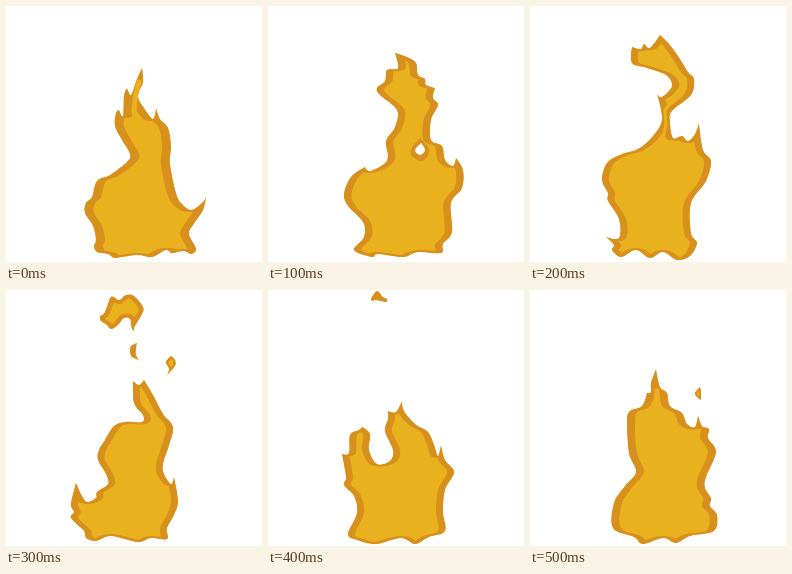
An HTML page that plays this animation: 256x256 px, repeating every 600 ms.

```html
<!DOCTYPE html>
<html lang="en">
<head>
<meta charset="utf-8">
<title>Flame</title>
<style>
html, body { margin: 0; width: 100%; height: 100%; overflow: hidden; background: #fff; }
svg { display: block; width: 100vw; height: 100vh; }
</style>
</head>
<body>
<svg id="stage" viewBox="0 0 256 256"></svg>
<script>
const STEP = 100;
const RIM = '#d8901d', CORE = '#eab11e', PAPER = '#fff';
const stage = document.getElementById('stage');
const layers = [];
let clips = 0;

function make(tag, attrs, ...children) {
  const node = document.createElementNS(stage.namespaceURI, tag);
  for (const name in attrs) node.setAttribute(name, attrs[name]);
  node.append(...children);
  return node;
}

// Closed smooth curve through "x,y" points; "!" marks a sharp one. x is divided by squash.
function smooth(text, squash = 1) {
  const pts = text.trim().split(/\s+/).map(word => {
    const [x, y] = word.split(',').map(parseFloat);
    return { x: x / squash, y, sharp: word.endsWith('!') };
  });
  const at = i => pts[(i + pts.length) % pts.length];
  const handle = (i, sign) => {
    const p = at(i), k = p.sharp ? 0 : sign / 6;
    return `${p.x + (at(i + 1).x - at(i - 1).x) * k} ${p.y + (at(i + 1).y - at(i - 1).y) * k}`;
  };
  const curves = pts.map((p, i) =>
    `C${handle(i, 1)} ${handle(i + 1, -1)} ${at(i + 1).x} ${at(i + 1).y}`);
  return `M${pts[0].x} ${pts[0].y}${curves.join('')}Z`;
}

const flat = (fill, outline) => make('path', { d: smooth(outline), fill });

// A bright line that runs up a narrow neck.
const vein = (line, width) => make('polyline', {
  points: line, fill: 'none', stroke: CORE, 'stroke-width': width,
  'stroke-linecap': 'round', 'stroke-linejoin': 'round'
});

// Bright body with an inner rim drawn by an oval pen: wide on the sides, thin above and below.
function blob(outline, side, thin = 2) {
  const squash = side / thin, d = smooth(outline, squash), id = `clip${clips++}`;
  return make('g', { transform: `scale(${squash} 1)` },
    make('clipPath', { id }, make('path', { d })),
    make('path', {
      d, fill: CORE, stroke: RIM, 'stroke-width': thin * 2,
      'stroke-linejoin': 'round', 'clip-path': `url(#${id})`
    }));
}

function pose(...parts) {
  const layer = make('g', {}, ...parts);
  layers.push(layer);
  stage.append(layer);
}

pose(
  blob(`136,62! 137,76 132,90 138,102 147,113 150,102! 154,113 162,122 165,140 164,158 170,187
    175,197 185,204 196,197 200,191! 197,204 187,219 183,228 190,243 185,248 178,245 166,247
    160,244 146,251 132,249 116,251 108,252 102,248 91,246 88,240 90,234 87,220 79,207 80,197
    86,191 91,175 104,169 121,156 124,148 116,134 109,120 110,107 113,104! 117,110 118,90
    121,83 125,89 131,73`, 9),
  vein('133,76 129,92 128,106 134,118', 5)
);

pose(
  blob(`127,47! 139,51 148,57 150,69 157,73 158,79 167,82! 165,92 170,99 163,114 163,134 174,140
    177,154 185,160 188,152! 195,164 194,182 183,197 184,226 175,238 173,247 150,246 135,251
    110,248 104,251 86,244 96,231 95,216 80,200 76,188 83,171 97,161! 102,165 116,158 120,150
    118,135 127,121 129,104 112,89 109,82 117,75 119,64 130,62`, 7.5),
  flat(RIM, '152,132! 161,143 158,152 152,155 143,149 145,140'),
  flat(PAPER, '153,137! 157,144 152,149 147,144')
);

pose(
  blob(`130,29! 139,38 148,50 158,66 164,73 161,89 142,105 140,116 143,132 152,130 158,135 165,128
    169,117! 173,144 181,155 176,175 161,197 161,227 167,237 160,250 147,254 133,246 120,252
    106,244 91,251 82,244 84,239 76,231! 89,232 89,213 78,195 78,187 72,174 77,157 92,148
    108,143 123,130 132,113 127,88! 132,91 142,80 136,69 117,62 102,57 102,41! 111,43 114,38
    120,42`, 7),
  vein('133,134 136,118 135,104 143,94', 3)
);

pose(
  blob(`94,26! 99,22 105,7 113,10 120,5 128,6 137,17 136,24 128,38 130,41! 126,39 124,29 118,28
    112,35 105,39 101,35 95,31`, 5, 4),
  flat(RIM, '131,53! 125,56 124,62 126,67 133,70! 130,65 130,59'),
  blob('165,66! 169,70 169,76 161,85! 163,79 160,72', 2.5, 2),
  blob(`127,91! 133,95 138,90! 147,105 157,124 167,137 163,155 157,174 158,184 165,194 168,187!
    172,211 168,225 161,238 161,249 145,248 132,252 105,246 90,251 80,248 78,241 65,228 68,222
    65,214 70,193! 76,206 81,212 90,208 91,202 102,194 100,184 92,170 93,160 99,150 108,136
    120,132 136,132 137,125 128,113`, 7)
);

pose(
  flat(RIM, '109,1 115,7 119,9 118,12 108,10 105,11 103,9'),
  blob(`134,111! 136,121 147,134 160,142 166,155 170,166 173,155! 177,170 186,182 177,200 175,222
    177,241 161,247 147,254 133,248 108,254 89,250 80,244 89,223 86,206 76,195 78,187 74,164!
    81,163 82,145 91,140 94,137! 102,144 101,160 109,174 122,171 125,160 117,141 120,129
    120,121! 128,122`, 7)
);

pose(
  blob('170,97! 171,101 171,110! 167,107 165,103', 2, 1.5),
  blob(`126,79! 130,97 137,103 140,116 152,123 157,134 165,137 168,125! 172,136 179,139 178,148
    186,162 176,187 175,198 181,208 180,216 187,225 184,241 160,246 146,253 133,248 113,254
    104,247 83,238 84,213 95,196 106,182 99,163 97,131 100,121 112,116 117,103! 121,102
    121,93`, 8),
  vein('127,101 126,118', 5)
);

function show(time) {
  const now = Math.floor(time / STEP) % layers.length;
  layers.forEach((layer, i) => layer.setAttribute('display', i === now ? 'inline' : 'none'));
}

const start = performance.now();
function tick() {
  show(performance.now() - start);
  requestAnimationFrame(tick);
}
show(0);
requestAnimationFrame(tick);
</script>
</body>
</html>
```
